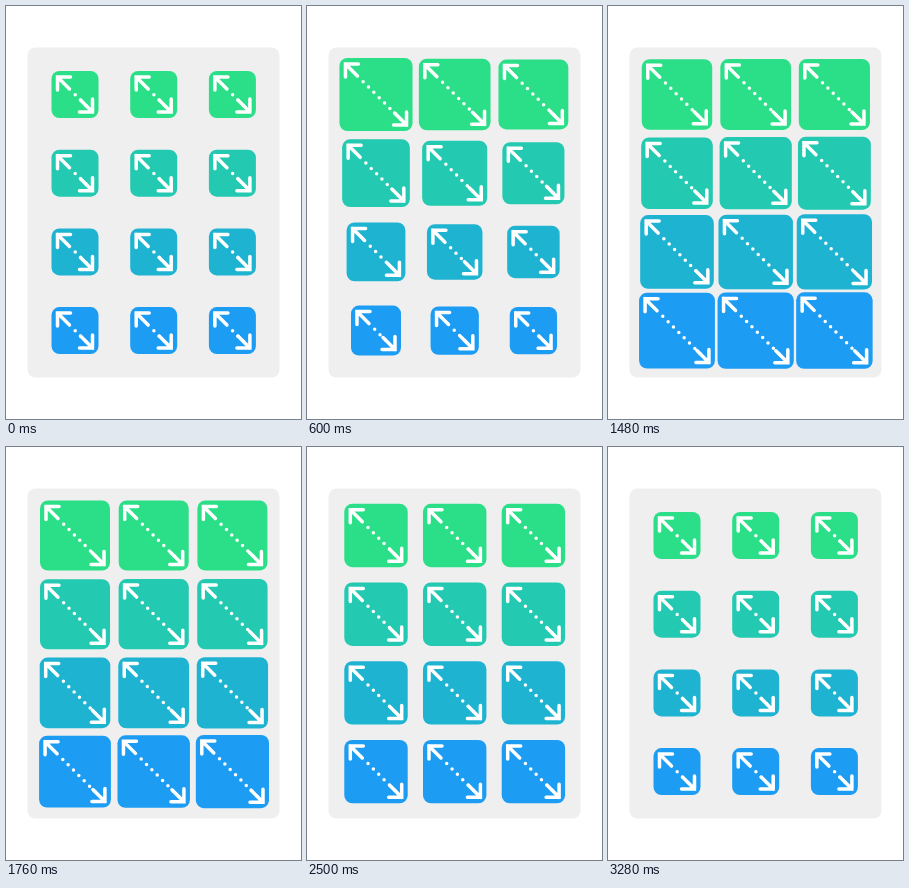
Recreate the animation shown at these times as an HTML page. Size 295 px wide and 413 px high, loop 3.3 s.

```html
<!DOCTYPE html>
<html lang="en">
<head>
<meta charset="utf-8">
<title>Resizing tiles</title>
<style>
html, body { margin: 0; width: 100%; height: 100%; overflow: hidden; background: #fff; }
svg { display: block; }
.mark { fill: none; stroke: #fff; stroke-width: 3.5; stroke-linecap: round; stroke-linejoin: miter; }
</style>
</head>
<body>
<svg id="stage" width="295" height="413" viewBox="0 0 295 413">
  <rect x="21.5" y="41.5" width="252" height="330" rx="8" fill="#efefef"/>
</svg>
<script>
const LOOP = 3300, STAGGER = 50, SHRINK = 2250;
const SMALL = 47, PEAK = 76.5, REST = 70;
const INSET = 6, FIRST_DOT = 17.7, DOT_GAP = 5.35;
const ROWS = ['#2adf87', '#23c9b0', '#1fb3d2', '#1c9cf3'];
const stage = document.getElementById('stage');

function add(parent, name, attrs) {
  const el = document.createElementNS('http://www.w3.org/2000/svg', name);
  for (const key in attrs) el.setAttribute(key, attrs[key]);
  return parent.appendChild(el);
}

// Cubic bezier easing with control points (x1, 0) and (x2, 1)
function ease(x, x1, x2) {
  if (x <= 0) return 0;
  if (x >= 1) return 1;
  let lo = 0, hi = 1, u = 0.5;
  for (let i = 0; i < 24; i++) {
    u = (lo + hi) / 2;
    const v = 1 - u;
    if (3 * u * v * v * x1 + 3 * u * u * v * x2 + u * u * u < x) lo = u;
    else hi = u;
  }
  return u * u * (3 - 2 * u);
}

const mix = (a, b, p) => a + (b - a) * p;

function sizeAt(t, i) {
  if (t >= SHRINK) return mix(REST, SMALL, ease((t - SHRINK) / 1050, 0.33, 0.2));
  const local = t - i * STAGGER;
  if (local < 900) return mix(SMALL, PEAK, ease(local / 900, 0.33, 0.36));
  return mix(PEAK, REST, ease((local - 900) / 800, 0.33, 0.36));
}

const tiles = [];
for (let i = 0; i < 12; i++) {
  const row = Math.floor(i / 3), col = i % 3;
  const g = add(stage, 'g', { transform: `translate(${69 + col * 78.7} ${88.5 + row * 78.7})` });
  const box = add(g, 'rect', { rx: 8, fill: ROWS[row] });
  const dots = add(g, 'path', { class: 'mark', 'stroke-dasharray': `0 ${DOT_GAP * Math.SQRT2}` });
  const arrow = 'M0 13V0H13M0 0L12 12';
  const heads = [0, 180].map(() => add(g, 'path', { class: 'mark', d: arrow }));
  tiles.push({ box, dots, heads });
}

function draw(t) {
  tiles.forEach(({ box, dots, heads }, i) => {
    const size = sizeAt(t, i), half = size / 2, tip = half - INSET;
    box.setAttribute('x', -half);
    box.setAttribute('y', -half);
    box.setAttribute('width', size);
    box.setAttribute('height', size);
    const from = FIRST_DOT - tip, to = tip - 5;
    dots.setAttribute('d', `M${from} ${from}L${to} ${to}`);
    heads[0].setAttribute('transform', `translate(${-tip} ${-tip})`);
    heads[1].setAttribute('transform', `translate(${tip} ${tip}) rotate(180)`);
  });
}

const start = performance.now();
function frame() {
  draw((performance.now() - start) % LOOP);
  requestAnimationFrame(frame);
}
draw(0);
requestAnimationFrame(frame);
</script>
</body>
</html>
```
